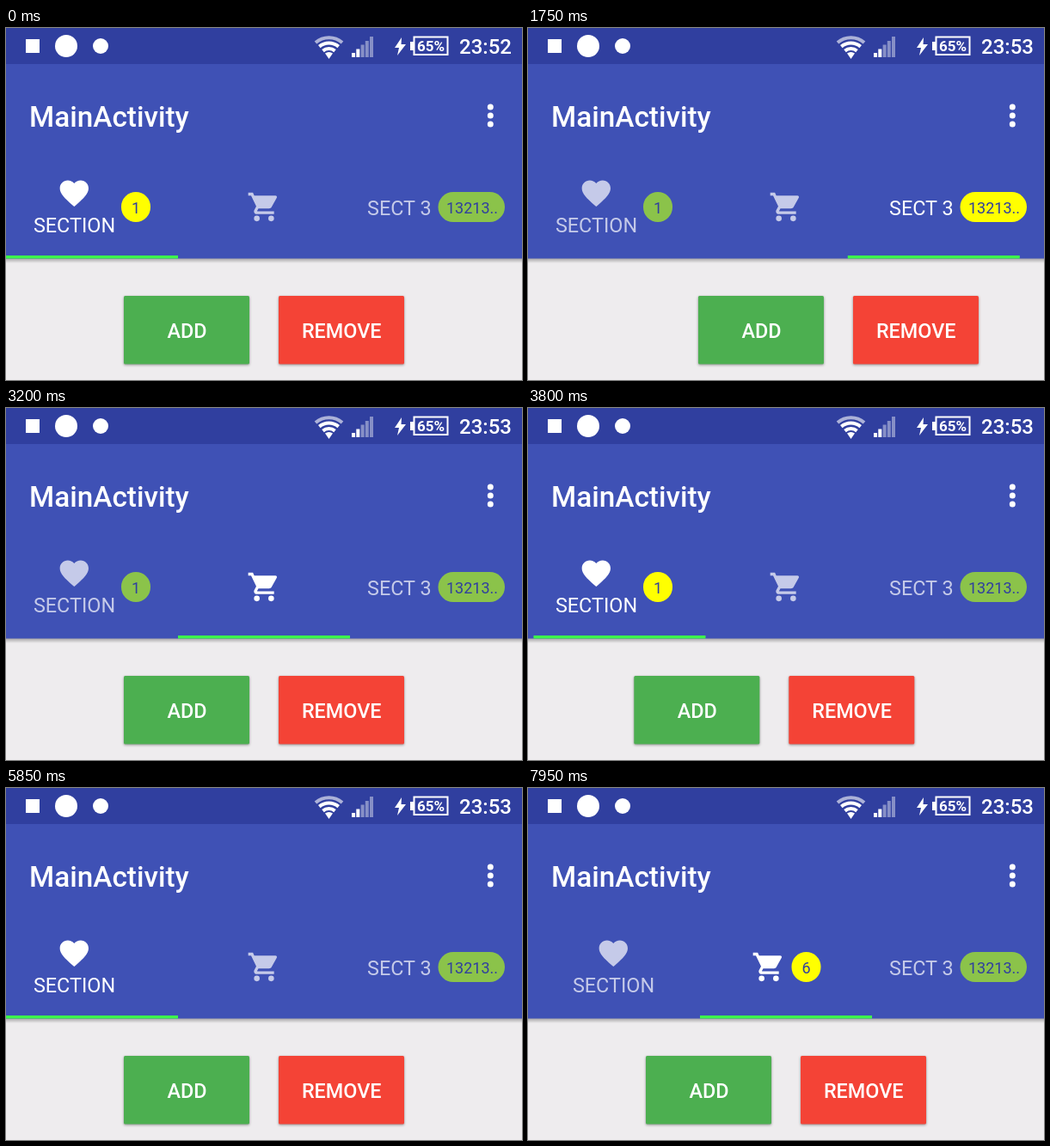
An HTML page that plays this animation: 600x410 px, repeating every 8000 ms.

```html
<!DOCTYPE html>
<html lang="en">
<head>
<meta charset="utf-8">
<title>Tabs with badges</title>
<style>
  html, body { margin: 0; width: 100%; height: 100%; overflow: hidden; background: #eeecee; }
  svg { display: block; }
  text { font: 23.4px Roboto, sans-serif; }
  .medium { font-weight: 500; }
  .badge text { font-size: 18px; fill: #303f9f; }
  .middle { text-anchor: middle; }
  .button { filter: drop-shadow(0 1.5px 1.5px rgba(0, 0, 0, .4)); }
</style>
</head>
<body>
<svg width="600" height="410" viewBox="0 0 600 410">
  <defs>
    <linearGradient id="barShadow" x2="0" y2="1">
      <stop stop-opacity=".32"/><stop offset="1" stop-opacity="0"/>
    </linearGradient>
    <linearGradient id="edges">
      <stop stop-color="#000"/><stop offset=".35" stop-color="#fff"/>
      <stop offset=".7" stop-color="#fff"/><stop offset="1" stop-color="#000"/>
    </linearGradient>
    <mask id="fade" maskUnits="userSpaceOnUse" x="509" y="190" width="64" height="36">
      <rect x="509" y="190" width="64" height="36" fill="url(#edges)"/>
    </mask>
    <g id="page" fill="#fff">
      <rect class="button" x="137" y="312" width="146" height="79.5" rx="1.5" fill="#4caf50"/>
      <text class="medium middle" x="210.5" y="361">ADD</text>
      <rect class="button" x="317" y="312" width="146" height="79.5" rx="1.5" fill="#f44336"/>
      <text class="medium middle" x="390.3" y="361">REMOVE</text>
    </g>
  </defs>

  <rect width="600" height="410" fill="#eeecee"/>
  <g id="pager">
    <use href="#page"/><use href="#page" x="600"/><use href="#page" x="1200"/>
  </g>

  <rect y="268" width="600" height="6" fill="url(#barShadow)"/>
  <rect width="600" height="268.5" fill="#3f51b5"/>
  <rect width="600" height="42" fill="#303f9f"/>

  <!-- status bar -->
  <g fill="#fff">
    <rect x="23" y="13" width="16" height="16"/>
    <circle cx="70" cy="21" r="13"/>
    <circle cx="110" cy="21" r="9"/>
    <g fill="none" stroke="#fff" stroke-width="4">
      <path d="M360 17A24 24 0 0 1 391 17" opacity=".6"/>
      <path d="M364.3 21.6A17.5 17.5 0 0 1 386.7 21.6"/>
      <path d="M368.5 26.6A11 11 0 0 1 382.5 26.6"/>
    </g>
    <path d="M375.5 36L371 29.6A7 7 0 0 1 380 29.6z"/>
    <path d="M402 29h4v5h-4zM407.3 24.5h4v9.5h-4z"/>
    <path d="M412.6 19.5h4V34h-4zM417.8 15h4v19h-4zM423 10h4v24h-4z" opacity=".42"/>
    <path d="M460 11L452 23H457L455 32L465 19H459.5z"/>
    <path d="M470 16h4v10h-4z"/>
    <rect x="474.5" y="10.5" width="39" height="20.5" fill="none" stroke="#fff" stroke-width="2"/>
    <text class="middle" x="494" y="27" style="font-size:17px;font-weight:700">65%</text>
    <text id="clock" class="medium" x="527" y="30" style="font-size:24px"></text>
  </g>

  <!-- toolbar -->
  <g fill="#fff">
    <text class="medium" x="27" y="115" style="font-size:33.3px">MainActivity</text>
    <circle cx="563.3" cy="92" r="3.5"/><circle cx="563.3" cy="102" r="3.5"/><circle cx="563.3" cy="112" r="3.5"/>
  </g>

  <!-- tabs -->
  <g class="tab">
    <path transform="translate(59.3 172.5) scale(1.667)" d="M12 21.35l-1.45-1.32C5.4 15.36 2 12.28 2 8.5 2 5.42 4.42 3 7.5 3c1.74 0 3.41.81 4.5 2.09C13.09 3.81 14.76 3 16.5 3 19.58 3 22 5.42 22 8.5c0 3.78-3.4 6.86-8.55 11.54z"/>
    <text class="middle" x="79.5" y="238">SECTION</text>
  </g>
  <g class="tab">
    <path transform="translate(280 188.5) scale(1.667)" d="M7 18a2 2 0 1 0 0 4 2 2 0 0 0 0-4zM1 2v2h2l3.6 7.59-1.35 2.45C4.52 15.37 5.48 17 7 17h12v-2H7.42c-.14 0-.25-.11-.25-.25l.03-.12.9-1.63h7.45c.75 0 1.41-.41 1.75-1.03l3.58-6.49A1 1 0 0 0 20 4H5.21l-.94-2zM17 18a2 2 0 1 0 0 4 2 2 0 0 0 0-4z"/>
  </g>
  <g class="tab"><text x="420" y="217.5">SECT 3</text></g>

  <g class="badge">
    <rect x="134" y="191" width="34" height="35" rx="17"/>
    <text class="middle" x="151" y="215.5"></text>
  </g>
  <g class="badge">
    <rect x="306.5" y="191" width="34" height="35" rx="17"/>
    <text class="middle" x="323.5" y="215.5"></text>
  </g>
  <g class="badge">
    <rect x="502.5" y="191" width="77.5" height="35" rx="17.5"/>
    <g id="longLabel"><text x="512" y="215.5"></text></g>
  </g>
  <rect id="indicator" y="265" width="200" height="3.5" fill="#3dfa4b"/>
</svg>

<script>
const LOOP = 8000, SWIPE = 400;
const MARQUEE_START = 2100, MARQUEE_SPEED = 0.1;
const REMOVE_AT = 5700, FADE = 150;
const addTimes = [4700, 5050, 7000, 7350, 7700];
const swipes = [
  { at: 961, from: 0, to: 1 },
  { at: 1430, from: 1, to: 2 },
  { at: 2680, from: 2, to: 1 },
  { at: 3437, from: 1, to: 0 },
  { at: 6220, from: 0, to: 1 },
];

const byId = id => document.getElementById(id);
const pager = byId('pager'), indicator = byId('indicator');
const clock = byId('clock'), longLabel = byId('longLabel');
const tabs = document.querySelectorAll('.tab');
const badges = [...document.querySelectorAll('.badge')].map(group => ({
  group, shape: group.querySelector('rect'), label: group.querySelector('text'),
}));

const progress = (t, start, length) => Math.min(1, Math.max(0, (t - start) / length));
const smooth = p => p * p * (3 - 2 * p);
const ramp = (t, start) => smooth(progress(t, start, FADE));
const shift = (node, x) => node.setAttribute('transform', `translate(${x} 0)`);

function pagerState(t) {
  const { at, from, to } = swipes.findLast(s => t >= s.at) || swipes[0];
  const p = smooth(progress(t, at, SWIPE));
  return {
    page: from + (to - from) * p,
    marker: from + (to - from) * p ** 1.42, // the indicator trails the page
    selected: p < 0.5 ? from : to,
  };
}

function draw(t) {
  const { page, marker, selected } = pagerState(t);
  shift(pager, -600 * page);
  indicator.setAttribute('x', 200 * marker);
  clock.textContent = t < 1700 ? '23:52' : '23:53';

  tabs.forEach((tab, i) => tab.setAttribute('fill', i === selected ? '#fff' : '#c5cae9'));
  badges.forEach((b, i) => b.shape.setAttribute('fill', i === selected ? '#ff0' : '#8bc34a'));

  const count = 1 + addTimes.filter(at => t >= at).length;
  badges[0].label.textContent = Math.min(count, 3);
  badges[1].label.textContent = count;

  // A badge fades out before its tab recentres, and fades in after it has made room.
  const firstAdd = addTimes[2];
  badges[0].group.setAttribute('opacity', 1 - ramp(t, REMOVE_AT));
  shift(tabs[0], 20 * ramp(t, REMOVE_AT + FADE));
  shift(tabs[1], -20 * ramp(t, firstAdd));
  badges[1].group.setAttribute('opacity', ramp(t, firstAdd + FADE));

  const scrolling = selected === 2 && t >= MARQUEE_START;
  badges[2].label.textContent = scrolling ? '1321313131313131' : '13213..';
  shift(badges[2].label, scrolling ? -(t - MARQUEE_START) * MARQUEE_SPEED : 0);
  longLabel.setAttribute('mask', scrolling ? 'url(#fade)' : 'none');
}

function frame() {
  draw(performance.now() % LOOP);
  requestAnimationFrame(frame);
}
frame();
</script>
</body>
</html>
```
